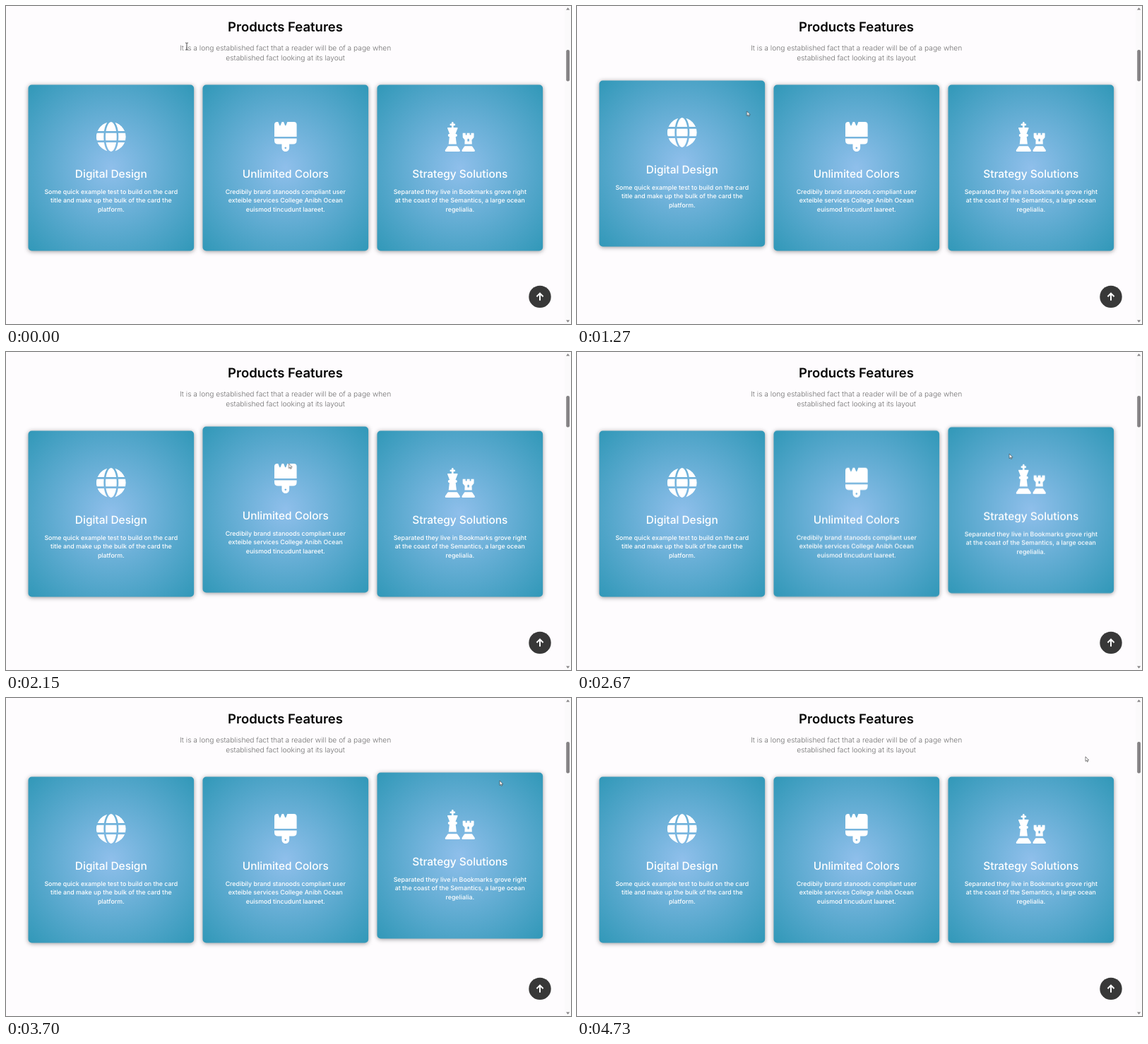
An HTML page that plays this animation: 800 px wide and 450 px high, repeating every 4820 ms.

```html
<!DOCTYPE html>
<html lang="en">
<head>
<meta charset="utf-8">
<title>Products Features</title>
<style>
  html, body { margin: 0; width: 100%; height: 100%; overflow: hidden; background: #fefcfe; }
  svg { display: block; width: 100vw; height: 100vh; }
  text { font-family: Inter, "Open Sans", sans-serif; text-anchor: middle; text-rendering: geometricPrecision; }
  .heading { font-size: 18.5px; font-weight: 600; fill: #050505; }
  .lead { font-size: 10.22px; font-weight: 300; fill: #707070; }
  .card { fill: #fff; }
  .panel { fill: url(#glow); filter: drop-shadow(0 1.5px 3px rgba(0, 0, 0, .4)); }
  .name { font-size: 15.45px; font-weight: 500; }
  .body { font-size: 8.8px; font-weight: 450; }
</style>
</head>
<body>
<svg viewBox="0 0 800 450">
  <defs>
    <radialGradient id="glow" r=".707">
      <stop offset="0" stop-color="#8fbfeb"/>
      <stop offset="1" stop-color="#3198b8"/>
    </radialGradient>
    <mask id="grid" maskUnits="userSpaceOnUse" x="-22" y="-22" width="44" height="44">
      <circle r="21" fill="#fff"/>
      <g fill="none" stroke="#000" stroke-width="2.6">
        <ellipse rx="9.2" ry="22.3"/>
        <path d="M-22-6.6H22M-22 6.6H22"/>
      </g>
    </mask>
    <g id="globe"><circle r="21" mask="url(#grid)"/></g>
    <g id="brush" fill-rule="evenodd">
      <path d="M-15.8 0V-17Q-15.8-21-11.8-21H-10.5L-8.6-16.3Q-7.9-15.3-7.1-16.3L-5.2-21H-2.7L-.8-16.3Q0-15.3 .7-16.3L2.6-21H11.8Q15.8-21 15.8-17V0Z"/>
      <path d="M-15.8 2.6H15.8V5.2Q15.8 10.5 10.5 10.5H5.3V15.8A5.3 5.3 0 0 1-5.3 15.8V10.5H-10.5Q-15.8 10.5-15.8 5.2ZM0 14.4a1.35 1.35 0 1 0 .01 0Z"/>
    </g>
    <g id="chess" stroke="#fff" stroke-linejoin="round">
      <path stroke-width="2.6" stroke-linecap="round" d="M-10.5-19.7V-12M-13-17.1H-8"/>
      <path stroke-width="1.6" d="M-17-12.3H-4L-7.2-4H-13.8Z"/>
      <path stroke-width="3.9" stroke-linecap="round" d="M-15.1-2H-5.9"/>
      <path stroke="none" d="M-14.8-1H-6.2L-4.9 10.5H-16.1Z"/>
      <path stroke-width="2" d="M-16.6 14.2H-4.4L-1 19.2V20H-20V19.2Z"/>
      <path stroke-width="3.2" stroke-dasharray="4 1.9" d="M3.9-3.7H19.7"/>
      <path stroke="none" fill-rule="evenodd" d="M3.9-2.6H19.7V1L16.7 4.6 17 10.5H6.6L6.8 4.6 3.9 1ZM10.5 6.5H13.1V4A1.3 1.3 0 0 0 10.5 4Z"/>
      <path stroke-width="2" d="M7 14.2H16.6L20 19.2V20H3.7V19.2Z"/>
    </g>
  </defs>

  <rect width="800" height="450" fill="#fefcfe"/>
  <text class="heading" x="395.5" y="36.4">Products Features</text>
  <text class="lead" x="395.6" y="62.6">It is a long established fact that a reader will be of a page when</text>
  <text class="lead" x="395.6" y="76.7">established fact looking at its layout</text>

  <g id="cards"></g>

  <circle cx="756" cy="411.4" r="15.7" fill="#383838"/>
  <path d="M756 416.8V407M751.4 411.2L756 406.6L760.6 411.2" fill="none" stroke="#fff" stroke-width="2"/>

  <rect x="791" width="9" height="450" fill="#fbfafb"/>
  <rect x="793.2" y="62" width="4.8" height="44.5" rx="2.2" fill="#858385"/>
  <path d="M793 5.5L795.6 2.2L798.2 5.5ZM793 444.5L795.6 447.8L798.2 444.5Z" fill="#858385"/>

  <g id="cursor">
    <path id="beam" d="M-2-5Q0-5 0-4Q0-5 2-5M0-4.5V4.5M-2 5Q0 5 0 4Q0 5 2 5" fill="none" stroke="#444" stroke-width=".9"/>
    <path id="arrow" d="M0 0V6.6L1.5 5.2L2.5 7.5L3.6 7L2.6 4.9H4.7Z" fill="#fff" stroke="#333" stroke-width=".6"/>
  </g>
</svg>

<script>
const LOOP = 4820, LIFT = 6, HOVER = 400, BEAM_END = 300;
const NS = "http://www.w3.org/2000/svg";
const byId = id => document.getElementById(id);
const shift = (x, y) => `translate(${x}px, ${y}px)`;

const cards = [
  { icon: "globe", name: "Digital Design", enter: 582, leave: 1378,
    body: ["Some quick example test to build on the card", "title and make up the bulk of the card the", "platform."] },
  { icon: "brush", name: "Unlimited Colors", enter: 1462, leave: 2378,
    body: ["Credibily brand stanoods compliant user", "exteible services College Anibh Ocean", "euismod tincudunt laareet."] },
  { icon: "chess", name: "Strategy Solutions", enter: 2438, leave: 4000,
    body: ["Separated they live in Bookmarks grove right", "at the coast of the Semantics, a large ocean", "regelialia."] }
];

// Where the pointer turns or changes pace
const stops = [
  { at: 0, x: 256, y: 57 },
  { at: 730, x: 186, y: 135, easing: "ease-in" },
  { at: 1610, x: 308, y: 166 },
  { at: 2150, x: 400, y: 158 },
  { at: 2670, x: 612, y: 144, easing: "ease-out" },
  { at: 3300, x: 663, y: 143 },
  { at: 3700, x: 699, y: 117, easing: "ease-out" },
  { at: 4500, x: 720, y: 83 },
  { at: LOOP, x: 720, y: 83 }
];

function add(parent, tag, attrs, text = "") {
  const el = document.createElementNS(NS, tag);
  for (const key in attrs) el.setAttribute(key, attrs[key]);
  el.textContent = text;
  return parent.appendChild(el);
}

function play(el, frames) {
  el.animate(frames.map(({ at, ...rest }) => ({ offset: at / LOOP, ...rest })),
    { duration: LOOP, iterations: Infinity });
}

function hover(el, enter, leave) {
  const down = shift(0, 0), up = shift(0, -LIFT);
  play(el, [
    { at: 0, transform: down },
    { at: enter, transform: down, easing: "ease" },
    { at: enter + HOVER, transform: up },
    { at: leave, transform: up, easing: "ease" },
    { at: leave + HOVER, transform: down },
    { at: LOOP, transform: down }
  ]);
}

function swap(el, from, to) {
  play(el, [
    { at: 0, opacity: from }, { at: BEAM_END, opacity: from },
    { at: BEAM_END, opacity: to }, { at: LOOP, opacity: to }
  ]);
}

cards.forEach(({ icon, name, body, enter, leave }, i) => {
  const left = 31.5 + i * 247, mid = left + 117.3;
  const g = add(byId("cards"), "g", { class: "card" });
  add(g, "rect", { class: "panel", x: left, y: 111.6, width: 234.6, height: 234.8, rx: 5 });
  add(g, "use", { href: "#" + icon, x: mid, y: 185 });
  add(g, "text", { class: "name", x: mid, y: 243.3 }, name);
  body.forEach((line, n) => add(g, "text", { class: "body", x: mid, y: 265.7 + n * 12.5 }, line));
  hover(g, enter, leave);
});

play(byId("cursor"), stops.map(({ x, y, ...rest }) => ({ transform: shift(x, y), ...rest })));
swap(byId("beam"), 1, 0);
swap(byId("arrow"), 0, 1);
</script>
</body>
</html>
```
